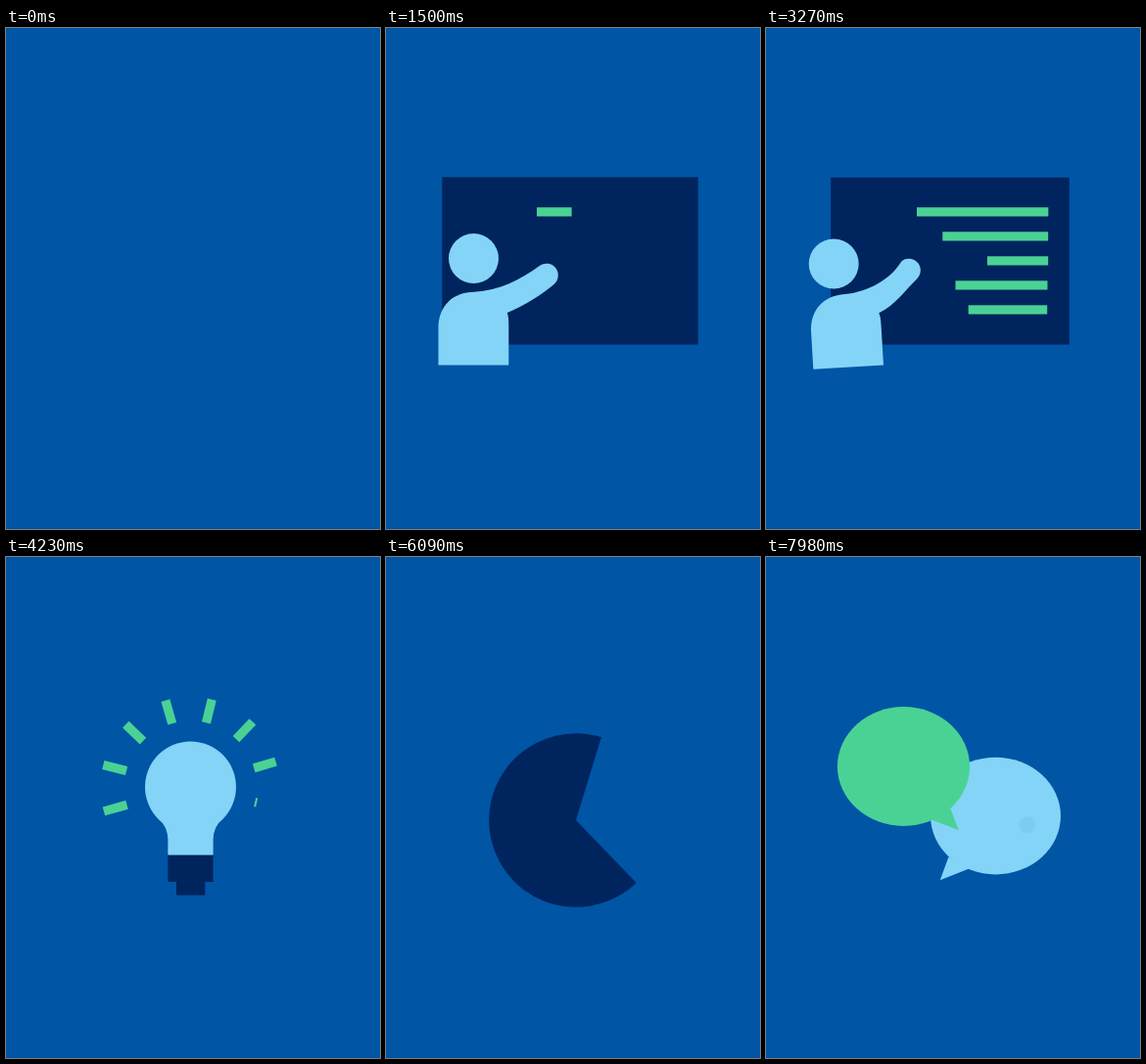
An HTML page with a canvas for the animation above (8000 ms loop, 382 by 512 pixels).

```html
<!DOCTYPE html>
<html lang="en">
<head>
<meta charset="utf-8">
<title>Lesson, idea, chart, talk</title>
<style>
  html, body { margin: 0; width: 100%; height: 100%; overflow: hidden; background: #0055a5; }
  canvas { display: block; width: 382px; height: 512px; }
</style>
</head>
<body>
<canvas width="382" height="512"></canvas>
<script>
const ctx = document.querySelector('canvas').getContext('2d');
const LOOP = 8000;
const BLUE = '#0055a5', EDGE = '#004f9c', NAVY = '#00245d', LIGHT = '#84d4f8', GREEN = '#4ad295';

const clamp = v => Math.min(1, Math.max(0, v));
const span = (t, from, to) => clamp((t - from) / (to - from));
const mix = (a, b, p) => a + (b - a) * p;
const sine = p => (1 - Math.cos(Math.PI * p)) / 2;
const easeIn = p => p * p;
const easeOut = p => 1 - (1 - p) ** 3;
const back = p => 1 + 2.5 * (p - 1) ** 3 + 1.5 * (p - 1) ** 2;
const rad = degrees => degrees * Math.PI / 180;

// Eased interpolation through [time, value] pairs.
function keys(t, ...points) {
  let i = 0;
  while (i < points.length - 2 && t > points[i + 1][0]) i++;
  const [from, a] = points[i], [to, b] = points[i + 1];
  return mix(a, b, sine(span(t, from, to)));
}

function rect(x, y, w, h, color) {
  if (w <= 0 || h <= 0) return;
  ctx.fillStyle = color;
  ctx.fillRect(x, y, w, h);
}

function ellipse(x, y, rx, ry, color) {
  if (rx <= 0 || ry <= 0) return;
  ctx.fillStyle = color;
  ctx.beginPath();
  ctx.ellipse(x, y, rx, ry, 0, 0, 2 * Math.PI);
  ctx.fill();
}

const circle = (x, y, r, color) => ellipse(x, y, r, r, color);

function shape(d, color) {
  ctx.fillStyle = color;
  ctx.fill(new Path2D(d));
}

// Angles run clockwise from the top, in degrees.
function wedge(x, y, r, from, to, color) {
  if (to <= from) return;
  ctx.fillStyle = color;
  ctx.beginPath();
  ctx.moveTo(x, y);
  ctx.arc(x, y, r, rad(from - 90), rad(to - 90));
  ctx.fill();
}

function group(draw) {
  ctx.save();
  draw();
  ctx.restore();
}

function board(t) {
  const grow = back(span(t, 600, 1400));
  const fold = span(t, 3150, 3570);
  const w = mix(261.5, 46, easeIn(fold));
  const bottom = mix(323.5, 331.5, fold ** 5);
  const h = mix(171, 27, fold ** 5) * grow;
  const x = 188 - w / 2;
  rect(x, bottom - h, w, h, NAVY);

  group(() => {
    ctx.beginPath();
    ctx.rect(x, bottom - h, w, h);
    ctx.clip();
    [154, 180.3, 226, 193.5, 206.7].forEach((left, i) => {
      const written = span(t, 1430 + i * 270, 1700 + i * 270);
      const erased = easeIn(span(t, 3250, 3480));
      rect(left, 183.3 + i * 25, (289.5 - i * 0.4 - left) * written * (1 - erased), 9.2, GREEN);
    });
  });
}

function person(t) {
  const rise = back(span(t, 400, 1000));
  const lean = 1.42 * easeIn(span(t, 2820, 3360));
  const leave = sine(span(t, 3360, 3600));
  const writing = t > 1500 && t < 2780;
  const wave = writing ? Math.sin((t - 1500) / 270 * 2 * Math.PI) : 0;
  const nod = sine(span(t, 1800, 2300)) * (1 - sine(span(t, 2500, 2800)));
  const handX = 164 - 7 * lean + 6 * wave;
  const handY = 252.5 - 3.5 * lean - 3 * wave;

  group(() => {
    ctx.translate(mix(89.5 - 5.3 * lean, 188, leave), mix(344.5 + 2.2 * lean, 305, leave));
    ctx.rotate(rad(-3.4 * lean * (1 - leave)));
    ctx.scale(1 - 0.8 * leave, rise * (1 - 0.8 * leave));
    ctx.translate(-89.5, -344.5);
    shape(`M53.5 344.5V307C53.5 284 68 270 90 269.7C115 268.5 138 257 ${handX - 7} ${handY - 9.7}
      A12 12 0 0 1 ${handX + 7.7} ${handY + 9.2}
      C${handX - 5} ${handY + 20} 142 283 123.8 291
      C125 294 125.3 298 125.3 304V344.5Z`, LIGHT);
  });

  const headX = 89.5 - 20.5 * lean - 4 * nod;
  const headY = mix(344.5, 235.5, rise) + 5.5 * lean;
  circle(mix(headX, 188.5, leave), mix(headY, 235, leave), mix(25.5 * clamp(rise), 46.5, leave), LIGHT);
}

function rays(t) {
  const turn = keys(t, [3650, -30], [4230, -1.2], [4440, 14], [4710, 0]);
  for (let i = 0; i < 8; i++) {
    const grow = span(t, 3660 + i * 74, 3860 + i * 74);
    const hide = easeIn(span(t, 5130 + i * 25, 5330 + i * 25));
    group(() => {
      ctx.translate(188.5, 235);
      ctx.rotate(rad(-104.5 + i * 29.85 + turn));
      const inner = 67.5 + 24.5 * hide;
      const length = 24.5 * easeOut(grow) * (1 - hide);
      const shown = i === 7 ? 24.5 * grow * grow * (1 - hide) * (grow < 1 ? 1.17 : 1) : length;
      rect(-4.6, -inner - Math.min(24.5, shown), 9.2, Math.min(24.5, shown), GREEN);
    });
  }
}

function bulb(t) {
  const stretch = keys(t, [3600, 0], [3720, 9], [3900, 0]);
  const shrink = 1 - easeIn(span(t, 5500, 5800));
  const foot = back(span(t, 3580, 3780));
  rays(t);
  group(() => {
    ctx.translate(188.5, 318);
    ctx.scale(shrink, shrink);
    ctx.translate(-188.5, -318);
    rect(174, 331 + stretch, 29.3, 14.6 * foot, NAVY);
    rect(165.4, 304.5 + stretch, 46.2, 27.5, NAVY);
    circle(188.5, 235, 46.5, LIGHT);
    const base = 304.6 + stretch;
    shape(`M155 266Q165.4 276 165.4 289V${base}H211.6V289Q211.6 276 222 266Z`, LIGHT);
  });
}

function chart(t) {
  const appear = easeOut(span(t, 5600, 6030));
  const merge = sine(span(t, 7050, 7550));
  const drift = span(t, 7050, 7540);
  const x = mix(mix(188.5, 194, appear), 216, drift);
  const y = mix(mix(318, 269, appear), 285, drift);
  const r = 88.8 * appear;
  const turn = -17 * easeOut(span(t, 7050, 7340));
  const opened = sine(span(t, 5840, 6075));
  const start = 17 + turn;
  const end = mix(17 + 119 * opened, 390, merge);

  wedge(x, y, r, Math.min(end, 360 + start), 377 + turn, NAVY);

  const greenEnd = t < 7050 ? mix(47, 136, easeOut(span(t, 6250, 6720))) : end;
  if (t > 6250) wedge(x, y, r, 47 + turn, greenEnd, GREEN);

  if (t > 6120 && merge < 1) {
    const dx = keys(t, [6120, 0], [6500, 43], [6810, 32], [7050, 32], [7130, 43], [7340, 0]);
    const dy = keys(t, [6120, 0], [6500, -73], [6810, -32], [7050, -32], [7130, -73], [7340, 0]);
    const size = r * easeOut(span(t, 6120, 6400));
    wedge(x + dx, y + dy, size, start, 47 + turn, LIGHT);
    if (end > 360) wedge(x, y, r, 360, end, GREEN);
  }
}

function bubble(x, y, rx, ry, tail, color) {
  ellipse(x, y, rx, ry, color);
  ctx.fillStyle = color;
  ctx.beginPath();
  tail.forEach(([dx, dy]) => ctx.lineTo(x + dx, y + dy));
  ctx.fill();
}

function talk(t) {
  const p = easeIn(span(t, 7550, 7975));
  const out = sine(span(t, 7600, 7950));
  bubble(mix(216, 234.5, out), mix(285, 264.6, out), mix(40, 66.5, out), mix(40, 59.8, out),
    [[-48 * out, 42 * out], [-56.7 * out, 65.6 * out], [-27 * out, 54 * out]], LIGHT);
  ctx.globalAlpha = 0.35 * span(t, 7930, 7980);
  circle(267, 274, 8.5, '#70bae3');
  ctx.globalAlpha = 1;
  bubble(mix(216, 140.5, p), mix(285, 214, p), mix(88.8, 67.6, p), mix(88.8, 60.9, p),
    [[48 * p, 43.5 * p], [56.3 * p, 65 * p], [27 * p, 54 * p]], GREEN);
}

function draw(t) {
  rect(0, 0, 382, 512, BLUE);
  rect(0, 511, 382, 1, EDGE);
  if (t >= 400 && t < 3600) {
    board(t);
    person(t);
  } else if (t >= 3600 && t < 5800) {
    if (t > 5600) chart(t);
    bulb(t);
  } else if (t >= 5800 && t < 7550) {
    chart(t);
  } else if (t >= 7550) {
    talk(t);
  }
}

const begin = performance.now();
function tick() {
  draw((performance.now() - begin) % LOOP);
  requestAnimationFrame(tick);
}
tick();
</script>
</body>
</html>
```
